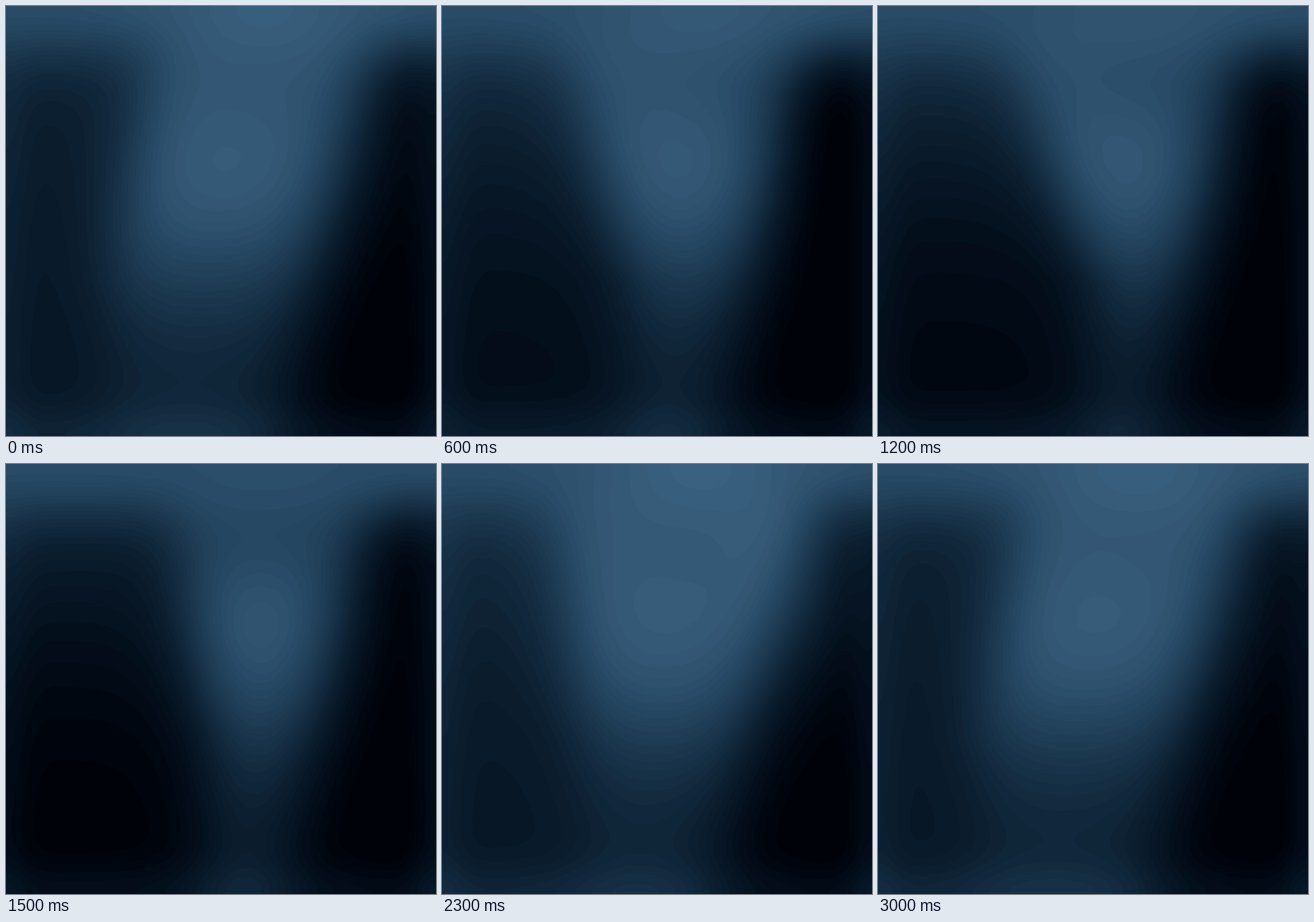
Recreate the animation shown at these times as an HTML page with a canvas. Size 748x748 px, loop 3100 ms.

```html
<!DOCTYPE html>
<html lang="en">
<head>
<meta charset="utf-8">
<title>Deep blue drift</title>
<style>
  html, body { margin: 0; width: 100%; height: 100%; overflow: hidden; background: #000209; }
  canvas { display: block; width: 100%; height: 100%; }
</style>
</head>
<body>
<canvas id="stage" width="748" height="748"></canvas>
<script>
const SIZE = 748, LOOP = 3100, STEP = 100, LEVELS = 36;

// glow: how far the light spreads to the left; lean: tilt of its left side;
// right: light spilling over the upper right.
const KEYS = [
  { t: 0,    glow: 0.64, lean: -0.1, right: 0.2 },
  { t: 300,  glow: 0,    lean: -0.2, right: -0.4 },
  { t: 800,  glow: 0.72, lean: 1,    right: 0 },
  { t: 1500, glow: 0.07, lean: 0.4,  right: 0 },
  { t: 2000, glow: 1,    lean: -0.2, right: 1 },
  { t: 2600, glow: 0.4,  lean: 0.9,  right: 0.15 },
  { t: 3000, glow: 0.68, lean: -0.1, right: 0.3 }
];

const bell = (p, center, radius) => Math.exp(-(((p - center) / radius) ** 2));
const sigmoid = d => 1 / (1 + Math.exp(-d));
const mix = (a, b, k) => a + (b - a) * k;
const perPixel = fn => Float32Array.from({ length: SIZE }, (_, p) => fn(p + 0.5));

// Key i of the endless loop, with its time unrolled.
function keyAt(i) {
  const n = KEYS.length, lap = Math.floor(i / n), key = KEYS[i - lap * n];
  return { ...key, t: key.t + lap * LOOP };
}

function poseAt(t) {
  const i = KEYS.findLastIndex(key => key.t <= t);
  const [before, a, b, after] = [-1, 0, 1, 2].map(k => keyAt(i + k));
  const h = b.t - a.t, u = (t - a.t) / h, w = 1 - u;
  const ease = name => {
    const slopeA = (b[name] - before[name]) / (b.t - before.t);
    const slopeB = (after[name] - a[name]) / (after.t - a.t);
    return w * w * ((1 + 2 * u) * a[name] + u * h * slopeA) +
           u * u * ((1 + 2 * w) * b[name] - w * h * slopeB);
  };
  return { glow: ease('glow'), lean: ease('lean'), right: ease('right') };
}

const palette = Array.from({ length: LEVELS + 1 }, (_, n) => {
  const v = n / LEVELS;
  const r = Math.round(61 * v ** 1.35);
  const g = Math.round(2 + 98 * v ** 1.02);
  const b = Math.round(9 + 123 * v ** 0.95);
  return (255 << 24 | b << 16 | g << 8 | r) >>> 0;
});

// Parts of the light that depend on x alone.
const skyX = perPixel(x => bell(x, 450, 200));
const dimX = perPixel(x => bell(x, 450, 180));
const spillX = perPixel(x => bell(x, 630, 110));
const rimX = perPixel(x => 0.08 * bell(x, 0, 40) + 0.13 * bell(x, SIZE, 40));

const ctx = document.getElementById('stage').getContext('2d');
const image = ctx.createImageData(SIZE, SIZE);
const pixels = new Uint32Array(image.data.buffer);

function draw(t) {
  const { glow, lean, right } = poseAt(t);
  for (let row = 0, p = 0; row < SIZE; row++) {
    const y = row + 0.5;
    const beam = 0.36 + 0.58 * Math.exp(-((Math.max(0, y - 200) / 300) ** 3));
    const high = bell(y, 0, 330);
    const shade = -0.02 + 0.26 * high + glow * (0.34 - 0.2 * high) + lean * (0.22 * high - 0.05);
    const leftEdge = 320 - 155 * glow + 50 * lean + (Math.min(y, 480) - 300) * (0.6 * lean - 0.1);
    const rightEdge = 640 - 0.22 * y;
    const dim = 0.24 * (1 - glow) * bell(y, 100, 130);
    const spill = 0.45 * right * bell(y, 150, 220);
    const sky = bell(y, 0, 95);
    const ground = 0.13 * bell(y, SIZE, 55);

    for (let x = 0; x < SIZE; x++) {
      const lit = sigmoid((rightEdge - x) / 40);
      let v = mix(shade, beam, sigmoid((x - leftEdge) / 36));
      v = mix(-0.04, v, lit) - dim * dimX[x] + spill * spillX[x];
      v = mix(v + rimX[x] + ground, 0.75 + 0.3 * glow * skyX[x], sky);
      pixels[p++] = palette[Math.round(Math.min(1, Math.max(0, v)) * LEVELS)];
    }
  }
  ctx.putImageData(image, 0, 0);
}

const start = performance.now();
let shown = -1;
function tick() {
  const elapsed = Math.max(0, performance.now() - start) % LOOP;
  const t = Math.floor(elapsed / STEP) * STEP;
  if (t !== shown) draw(shown = t);
  requestAnimationFrame(tick);
}
tick();
</script>
</body>
</html>
```
